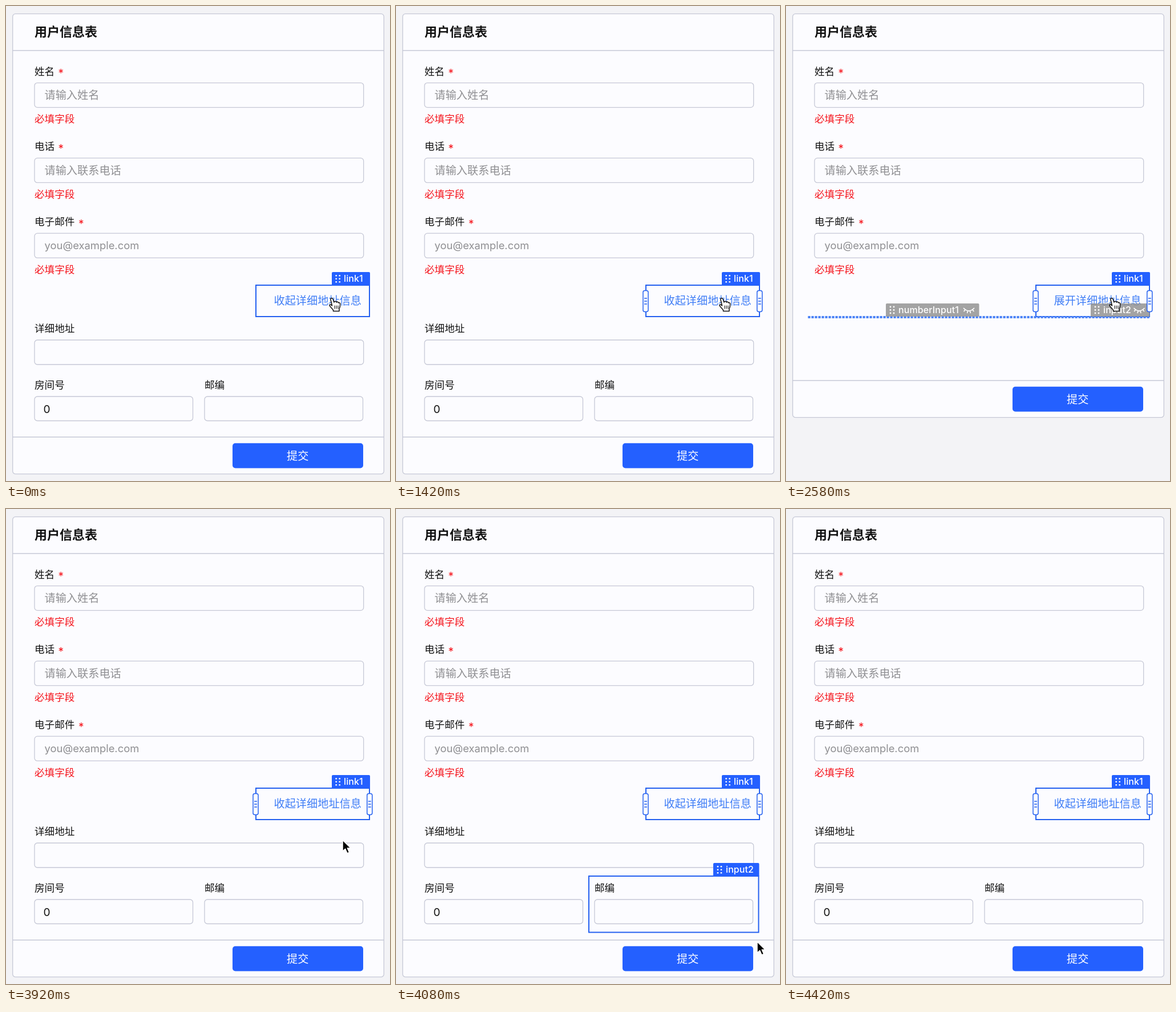
These frames come from a looping animation (673x832 px, 5010 ms). An HTML page:

```html
<!DOCTYPE html>
<html lang="zh-CN">
<head>
<meta charset="utf-8">
<title>用户信息表</title>
<style>
html, body { margin: 0; width: 100%; height: 100%; overflow: hidden; background: #f3f3f6; }
svg { display: block; width: 673px; height: 832px; }
text { font: 17.6px "Inter", "Noto Sans CJK SC", "Noto Sans CJK", sans-serif; fill: #111; }
.title { font-size: 22px; font-weight: 700; }
.big { font-size: 19.2px; }
.hint { font-size: 19.2px; fill: #8f8f92; }
.mail { font-size: 18.4px; }
.err, .star { fill: #f5141c; }
.star { font-size: 19px; }
.link { font-size: 19.2px; fill: #3f7df6; }
.tag { font-size: 16px; font-weight: 500; letter-spacing: .1px; fill: #fff; }
.white { fill: #fff; }
.line { fill: #fcfcff; stroke: #c6c8d6; stroke-width: 1.3; }
.sel { fill: none; stroke: #2460f0; stroke-width: 2; }
.grip { fill: #fff; stroke: #2460f0; stroke-width: 1.5; }
.blue { fill: #2460ff; }
.gray { fill: #949494; fill-opacity: .86; }

.card, .foot, .open, .shut, .grips, .hand, .arrow, .hover { animation: 5010ms step-end infinite; }
.card { animation-name: card; }
.foot { animation-name: foot; }
.open { animation-name: open; }
.shut { animation-name: shut; }
.grips { animation-name: grips; }
.hand { animation-name: hand; }
.arrow { animation-name: arrow; }
.hover { animation-name: hover; }
@keyframes card {
  0%, 28.343%, 71.457% { height: 806px; }
  1.596%, 51.497% { height: 707px; }
}
@keyframes foot {
  0%, 28.343%, 71.457% { transform: none; }
  1.596%, 51.497% { transform: translateY(-99px); }
}
@keyframes open {
  0%, 28.343%, 71.457% { opacity: 1; }
  1.596%, 51.497% { opacity: 0; }
}
@keyframes shut {
  0%, 28.343%, 71.457% { opacity: 0; }
  1.596%, 51.497% { opacity: 1; }
}
@keyframes grips { 0% { opacity: 0; } 1.596%, 100% { opacity: 1; } }
@keyframes hand { 0% { opacity: 1; } 78.243%, 100% { opacity: 0; } }
@keyframes arrow {
  0% { opacity: 0; transform: translate(590px, 580px); }
  78.243% { opacity: 1; transform: translate(590px, 580px); }
  79.84% { opacity: 1; transform: translate(614px, 674px); }
  81.436% { opacity: 1; transform: translate(633px, 758px); }
  83.233% { opacity: 1; transform: translate(649px, 812px); }
  84.83%, 100% { opacity: 0; transform: translate(660px, 840px); }
}
@keyframes hover {
  0%, 83.233%, 100% { opacity: 0; }
  79.84% { opacity: 1; }
}
</style>
</head>
<body>
<svg viewBox="0 0 673 832">
  <defs>
    <g id="dots" class="white">
      <circle r="1.4"/><circle cx="6" r="1.4"/>
      <circle cy="5.5" r="1.4"/><circle cx="6" cy="5.5" r="1.4"/>
      <circle cy="11" r="1.4"/><circle cx="6" cy="11" r="1.4"/>
    </g>
    <g id="eye" fill="none" stroke="#fff" stroke-width="1.7" stroke-linecap="round">
      <path d="M0 0Q9 9 18 0M2.6 2.4L.6 5M7 4.6L6.2 8M11 4.6L11.8 8M15.4 2.4L17.4 5"/>
    </g>
    <g id="grip">
      <rect class="grip" x="-4.5" y="-18.5" width="9" height="37" rx="3"/>
      <path d="M-2.5 -5h5M-2.5 0h5M-2.5 5h5" stroke="#2460f0" stroke-width="1.5"/>
    </g>
    <rect id="field" class="line" x="50" width="576.7" height="43" rx="5"/>
    <rect id="half" class="line" y="684" width="277.5" height="42.5" rx="5"/>
  </defs>

  <rect class="line card" x="11.7" y="13.7" width="650.6" height="806" rx="5"/>
  <path class="line" d="M12 78h650"/>
  <text class="title" x="50" y="53">用户信息表</text>

  <text x="50" y="120.5">姓名</text><text class="star" x="91.5" y="124">*</text>
  <use href="#field" y="134.6"/>
  <text class="hint" x="67.5" y="163.2">请输入姓名</text>
  <text class="err" x="50" y="204.3">必填字段</text>

  <text x="50" y="252.3">电话</text><text class="star" x="91.5" y="255.8">*</text>
  <use href="#field" y="266.4"/>
  <text class="hint" x="67.5" y="295">请输入联系电话</text>
  <text class="err" x="50" y="336">必填字段</text>

  <text x="50" y="384.2">电子邮件</text><text class="star" x="127" y="387.7">*</text>
  <use href="#field" y="398.2"/>
  <text class="hint mail" x="67.5" y="426.3">you@example.com</text>
  <text class="err" x="50" y="468">必填字段</text>

  <g class="open">
    <text class="link" x="469.5" y="523">收起详细地址信息</text>
    <text x="50" y="570.8">详细地址</text>
    <use href="#field" y="585"/>
    <text x="50" y="669.5">房间号</text>
    <use href="#half" x="50"/>
    <text class="big" x="65.5" y="712.7">0</text>
    <text x="348" y="669.5">邮编</text>
    <use href="#half" x="348"/>
  </g>

  <g class="foot">
    <path class="line" d="M12 755h650"/>
    <rect class="blue" x="397" y="765.7" width="229" height="43.7" rx="5"/>
    <text class="big white" x="492" y="795">提交</text>
  </g>

  <text class="link shut" x="469.5" y="523">展开详细地址信息</text>
  <rect class="sel" x="438" y="489" width="199" height="55"/>
  <path class="blue" d="M571 489v-21q0-2 2-2h63q2 0 2 2v21z"/>
  <use href="#dots" x="578.7" y="472.3"/>
  <text class="tag" x="592" y="483.4">link1</text>

  <g class="shut">
    <path d="M38.5 545H638" stroke="#4c83f6" stroke-width="4" stroke-dasharray="4.2 1.8"/>
    <path class="gray" d="M175 544v-21q0-2 2-2h159.500q2 0 2 2v21z"/>
    <use href="#dots" x="183" y="527"/>
    <text class="tag" x="197" y="538.3">numberInput1</text>
    <use href="#eye" x="311.500" y="529.500"/>
    <path class="gray" d="M534 544v-21q0-2 2-2h99.500q2 0 2 2v21z"/>
    <use href="#dots" x="542" y="527"/>
    <text class="tag" x="556" y="538.3">input2</text>
    <use href="#eye" x="610" y="529.500"/>
  </g>

  <g class="grips">
    <use href="#grip" x="437.500" y="517"/>
    <use href="#grip" x="637.300" y="517"/>
  </g>

  <g class="hover">
    <rect class="sel" x="338" y="643" width="297.500" height="98.500"/>
    <path class="blue" d="M556 643v-21q0-2 2-2h76.500q2 0 2 2v21z"/>
    <use href="#dots" x="564" y="626.300"/>
    <text class="tag" x="578" y="637.400">input2</text>
  </g>

  <g class="hand" fill="#fff" stroke="#111" stroke-width="1.5" stroke-linejoin="round" stroke-linecap="round">
    <path d="M571.500 525L569 514.500C568.300 511.500 572 510.500 573 513.500L575 519C575.500 516.800 578.500 516.800 579 519C580 517.500 582.300 518 582.500 520C584 519 585.700 520 585.700 522C585.800 526 585.300 528 584 530.500V534.500H573.500V532.500L567.500 525.500C566 523.200 568.500 521.300 571.500 525Z"/>
    <path d="M576 525v5M579 525v5M582 525v5" stroke-width="1.1"/>
  </g>
  <g class="arrow">
    <path d="M0 0V19.500L4.600 15.300L8 23L11.600 21.400L8.300 14H14.200Z" fill="#000" stroke="#fff" stroke-width="1.5" stroke-linejoin="round"/>
  </g>
</svg>
</body>
</html>
```
